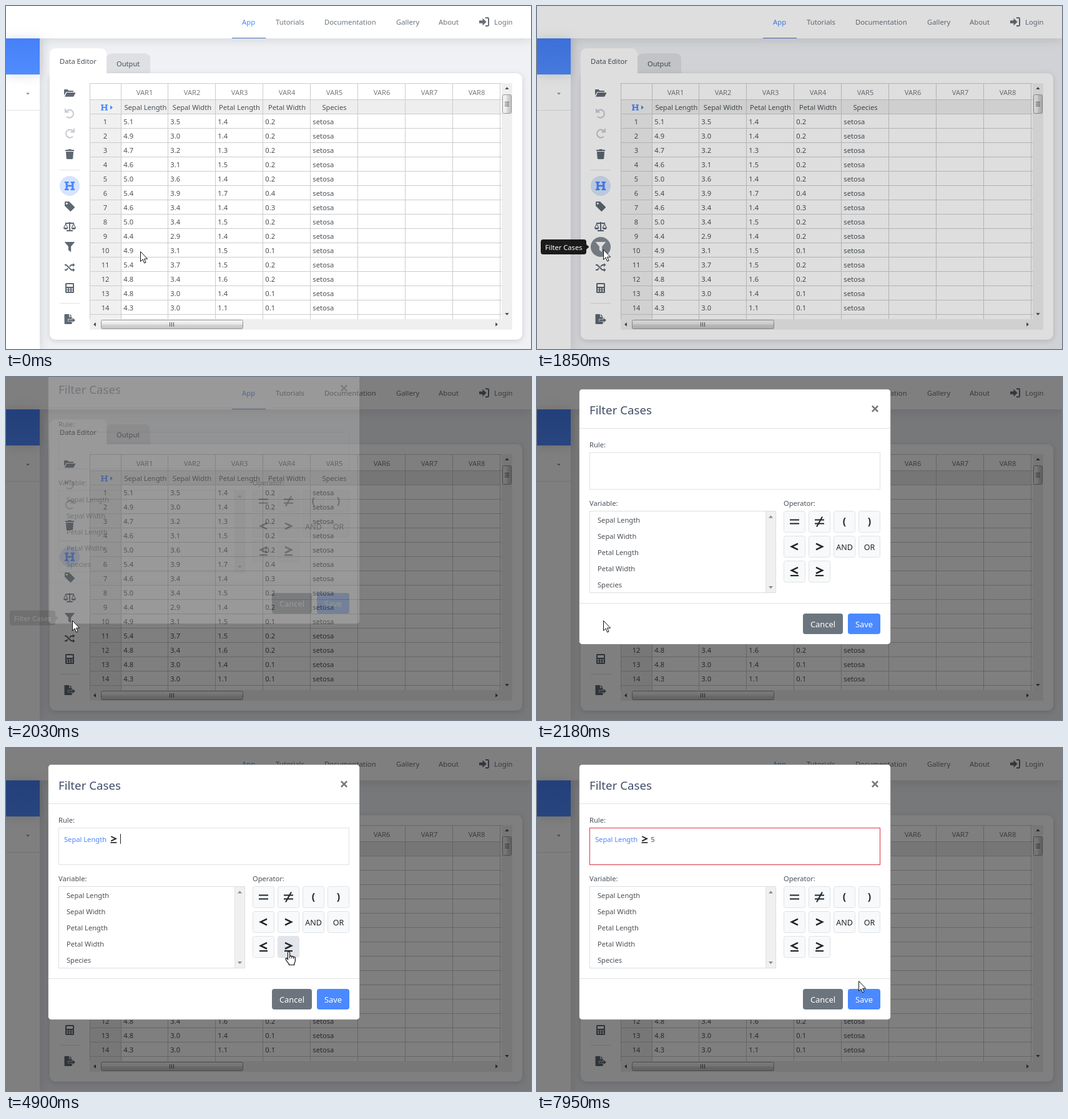
An HTML page for the animation above (8 s loop, 841 by 551 pixels).

```html
<!DOCTYPE html>
<html lang="en">
<head>
<meta charset="utf-8">
<title>Filter Cases</title>
<style>
  html, body { margin: 0; width: 100%; height: 100%; overflow: hidden; background: #f0f1f4; }
  svg { display: block; width: 841px; height: 551px; }
  text { font: 11.15px "Noto Sans", "Open Sans", sans-serif; fill: #495057; white-space: pre; }
  .mid { text-anchor: middle; }
  .nav { font-size: 11.3px; fill: #6c757d; }
  .blue { fill: #4a86fb; }
  .medium { font-weight: 500; }
  .muted { fill: #777c82; }
  .white { fill: #fff; }
  .heading { font-size: 18.7px; fill: #3f4d67; }
  .button { font-size: 12.9px; fill: #fff; }
  .word { font-size: 12.5px; fill: #212529; }
  .paren { font-size: 16px; font-weight: 700; fill: #212529; }
  .raised { filter: drop-shadow(0 2px 4px rgba(69, 80, 100, .22)); }
  .floating { filter: drop-shadow(0 1px 9px rgba(69, 80, 100, .2)); }
</style>
</head>
<body>
<svg id="stage" viewBox="0 0 841 551"></svg>
<script>
const LOOP = 8000;
const INK = '#5e6873', LIGHT = '#c9cdd2', BLUE = '#4a89ff', GRID = '#ccc';

// ---- drawing helpers ----
const rect = (x, y, w, h, fill, extra = '') =>
  `<rect x="${x}" y="${y}" width="${w}" height="${h}" fill="${fill}" ${extra}/>`;
const framed = (x, y, w, h, fill, stroke, radius = 0, extra = '') =>
  rect(x + .5, y + .5, w - 1, h - 1, fill, `stroke="${stroke}" rx="${radius}" ${extra}`);
const text = (x, y, value, cls = '') => `<text x="${x}" y="${y}" class="${cls}">${value}</text>`;
const path = (d, fill, extra = '') => `<path d="${d}" fill="${fill}" ${extra}/>`;
const stroke = (d, color, width, extra = '') =>
  path(d, 'none', `stroke="${color}" stroke-width="${width}" ${extra}`);
const group = (x, y, body, scale = '1') =>
  `<g transform="translate(${x} ${y}) scale(${scale})">${body}</g>`;
const layer = (id, body) => `<g id="${id}">${body}</g>`;
const range = n => [...Array(n).keys()];

// ---- icons, centred on 0,0 ----
const headingIcon = path('M-8-7h6.5v2.4h-1.7v3.2h6.4v-3.2h-1.7V-7H8v2.4H6.4v9.2H8V7H1.5V4.6h1.7V1.2h-6.4v3.4h1.7V7H-8V4.6h1.6v-9.2H-8z', BLUE);
const turnIcon = stroke('M-6-3A6.4 6.4 0 1 1-5 4.6M-7-8v5.4h5.6', LIGHT, 2.2);
const filterIcon = color => path('M-7.5-7.5H7.5L1.7-.8V7.5L-1.7 5V-.8Z', color, `stroke="${color}" stroke-linejoin="round"`);
const icons = {
  folder: path('M-9 3.5V-5q0-1 1-1h4.5l2 2H5q1 0 1 1v1H-5.5Z', INK) +
    path('M-4.8-1H8.6q1 0 .5 1L6.6 5q-.4.8-1.3.8H-8Z', INK),
  trash: path('M-7-7h4.2l.8-1h4l.8 1H7v2H-7ZM-6-4H6L5.3 6.6Q5.2 8 3.8 8h-7.6q-1.4 0-1.5-1.4Z', INK),
  tag: path('M-8-6.5Q-8-8-6.5-8H-1L7.6.4q.9.9 0 1.8L2.3 7.5q-.9.9-1.8 0L-8-1Z', INK) +
    '<circle cx="-4.7" cy="-4.7" r="1.5" fill="#fff"/>',
  scale: stroke('M0-7V7M-5 7H5M-7-5H7', INK, 1.9) +
    [-6.3, 6.3].map(x => group(x, 0, stroke('M-3 2L0-4L3 2', INK, 1.2) +
      path('M-3.7 2H3.7Q3.4 5 0 5T-3.7 2Z', INK))).join(''),
  shuffle: stroke('M-8-4h2.6L2.6 4H5.4M-8 4h2.6L-2.8 1.4M0-1.4L2.6-4H5.4', INK, 2) +
    path('M5-7L8.5-4L5-1ZM5 1L8.5 4L5 7Z', INK),
  calculator: rect(-7, -8, 14, 16, INK, 'rx="1.5"') + rect(-5, -6, 10, 4, '#fff') +
    range(6).map(i => rect(-5 + i % 3 * 3.9, .4 + (i / 3 | 0) * 3.4, 2.2, 2, '#fff')).join(''),
  exporting: path('M-8.5-7q0-1 1-1H-1v4.5h4.6V7q0 1-1 1h-10q-1 0-1-1ZM.2-8L3.6-4.6H.2Z', INK) +
    path('M-2.5.4H4.6V-2L9 1.7L4.6 5.4V3H-2.5Z', INK, 'stroke="#fff" stroke-width="1.2" paint-order="stroke"'),
  login: path('M-8-2.2h5.5V-6L3.6 0L-2.5 6V2.2H-8Z', '#666d75') +
    stroke('M2-6.4H5.6Q7-6.4 7-5V5Q7 6.4 5.6 6.4H2', '#666d75', 2)
};

// ---- page ----
const columnLines = [134, 184, ...range(9).map(i => 259 + 76 * i)];
const fields = ['Sepal Length', 'Sepal Width', 'Petal Length', 'Petal Width', 'Species'];
const measures = `5.1 3.5 1.4 0.2|4.9 3.0 1.4 0.2|4.7 3.2 1.3 0.2|4.6 3.1 1.5 0.2|5.0 3.6 1.4 0.2
|5.4 3.9 1.7 0.4|4.6 3.4 1.4 0.3|5.0 3.4 1.5 0.2|4.4 2.9 1.4 0.2|4.9 3.1 1.5 0.1|5.4 3.7 1.5 0.2
|4.8 3.4 1.6 0.2|4.8 3.0 1.4 0.1|4.3 3.0 1.1 0.1`.split('|').map(row => row.trim().split(' '));

function table() {
  const center = i => 222 + 76 * i;
  let s = rect(134, 124, 660, 379, '#fff') + rect(134, 150, 658, 24, '#eee') + rect(134, 150, 50, 353, '#f0f0f0');
  s += columnLines.filter(x => x < 794).map(x => rect(x, 124, 1, 379, GRID)).join('');
  s += rect(134, 124, 660, 1, GRID) + range(16).map(i => rect(134, 150 + 23 * i, 660, 1, GRID)).join('');
  s += range(8).map(i => text(center(i), 143, `VAR${i + 1}`, 'mid muted')).join('');
  s += fields.map((name, i) => text(center(i) + (i ? 0 : 1.5), 167, name, 'mid medium')).join('');
  s += group(157.5, 163, headingIcon, .68) + path('M167 159.5l4 3.5l-4 3.5z', BLUE);
  measures.forEach((row, r) => {
    const y = 190 + 23 * r;
    s += text(159, y, r + 1, 'mid');
    s += [...row, 'setosa'].map((v, c) => text(columnLines[c + 1] + 4.3, y, v)).join('');
  });
  return s;
}

function scrollbars() {
  const arrow = (x, y, turn) =>
    path('M-3.2 1.8L0-1.8L3.2 1.8Z', '#444', `transform="translate(${x} ${y}) rotate(${turn})"`);
  return rect(794, 124, 17, 396, '#efefef') + rect(134, 503, 677, 17, '#efefef') +
    framed(795, 142, 15, 31, 'url(#thumbX)', '#979797', 2) +
    framed(152, 504, 228, 15, 'url(#thumbY)', '#979797', 2) +
    range(3).map(i => rect(799, 154 + 3 * i, 7, 1, '#555') + rect(262 + 3 * i, 508, 1, 7, '#555')).join('') +
    arrow(802.5, 132, 0) + arrow(802.5, 495, 180) + arrow(142, 511.5, -90) + arrow(786, 511.5, 90);
}

function page() {
  const menu = [[378, 'App'], [432, 'Tutorials'], [510, 'Documentation'], [625, 'Gallery'], [693, 'About'], [782, 'Login']];
  const tools = [[140, icons.folder], [173, turnIcon], [205, turnIcon, '-1 1'], [238, icons.trash],
    [322, icons.tag], [354, icons.scale], [387, filterIcon(INK)], [420, icons.shuffle],
    [453, icons.calculator], [503, icons.exporting]];
  return rect(0, 0, 841, 551, '#f0f1f4') +
    rect(0, 52, 54, 499, '#fff', 'class="floating"') +
    rect(0, 0, 841, 52, '#fff', 'class="floating"') +
    rect(0, 52, 54, 58, 'url(#brand)', 'class="floating"') +
    path('M32 139.5h6l-3 3z', '#8a8f95') + rect(0, 167, 54, 1, '#e4e6e9') +
    menu.map(([x, name], i) => text(x, 30, name, i ? 'nav' : 'nav blue')).join('') +
    rect(362, 51, 54, 1, '#4a76c8') + group(766, 25.5, icons.login) +
    path('M161 108V86q0-10 10-10h50q10 0 10 10v22z', '#dfe0e3') +
    rect(70, 108, 757, 428, '#fff', 'rx="9" class="raised"') +
    path('M70 120V78q0-10 10-10h71q10 0 10 10v30h-60z', '#fff') +
    text(86, 93, 'Data Editor') + text(177, 97, 'Output') +
    tools.map(([y, body, scale]) => group(102, y, body, scale)).join('') +
    rect(86, 263, 32, 1, '#dee2e6') + rect(86, 477, 32, 1, '#dee2e6') +
    `<circle cx="102" cy="289" r="16" fill="#d7e4fd"/>` + group(102, 289, headingIcon) +
    layer('hover', '<circle cx="102" cy="387" r="16" fill="#858c95"/>' + group(102, 387, filterIcon('#fff'))) +
    table() + scrollbars();
}

// ---- dialog ----
const DARK = '#212529';
const compare = (side, lift = 0) =>
  stroke(`M${-5.5 * side} ${-4.8 - lift}L${4.6 * side} ${-lift}L${-5.5 * side} ${4.8 - lift}`, DARK, 2.5);
const underline = stroke('M-6.5 6.5H6.5', DARK, 2.2);
const equals = stroke('M-7.5-3H7.5M-7.5 3H7.5', DARK, 2);
const greaterEqual = compare(1, 1.8) + underline;
const operators = [
  equals, equals + stroke('M4.5-8L-4.5 8', DARK, 2),
  text(0, 5, '(', 'paren mid'), text(0, 5, ')', 'paren mid'),
  compare(-1), compare(1), text(0, 5, 'AND', 'word mid'), text(0, 5, 'OR', 'word mid'),
  compare(-1, 1.8) + underline, greaterEqual
].map((body, i) => ({ body, x: 395 + 40 * (i % 4), y: 222 + 40 * (i / 4 | 0) }));

function dialog() {
  return framed(67, 26, 500, 411, '#fff', 'rgba(0,0,0,.25)', 5) +
    text(84, 67, 'Filter Cases', 'heading') +
    group(541.5, 58, stroke('M-4.6-4.6L4.6 4.6M4.6-4.6L-4.6 4.6', '#777', 2.7)) +
    rect(68, 89, 498, 1, '#e0e2e4') + rect(68, 370, 498, 1, '#e0e2e4') +
    text(84, 120, 'Rule:') + text(84, 214, 'Variable:') + text(395, 214, 'Operator:') +
    framed(84, 128, 466, 60, '#fff', '#dfe1e4', 0, 'id="rule"') +
    layer('variable', text(93, 151, 'Sepal Length', 'blue medium')) +
    layer('operator', group(172.4, 147, greaterEqual, .76)) +
    layer('value', text(182.3, 151, '5')) +
    rect(0, 138, 1, 16, '#222', 'id="caret"') +
    framed(84, 222, 299, 132, '#fff', '#dcdee1') +
    rect(85, 223, 281, 26, '#f1f1f1', 'id="item"') +
    rect(366, 223, 16, 130, '#f0f0f0') + rect(366, 223, 1, 130, '#e3e3e3') +
    path('M371 233.5l3.5-4l3.5 4zM371 343l3.5 4l3.5-4z', '#8a8a8a') +
    fields.map((name, i) => text(97, 241 + 26 * i, name)).join('') +
    operators.map((o, i) => framed(o.x, o.y, 35, 35, '#f8f9fa', '#dfe2e6', 3, `id="op${i}"`) +
      group(o.x + 17.5, o.y + 17.5, o.body)).join('') +
    rect(426, 387, 64, 33, '#6c757d', 'rx="4"') + text(458, 409, 'Cancel', 'button mid') +
    rect(497, 386, 54, 35, 'none', 'rx="5" stroke="#a4c4ff" stroke-width="2" id="ring"') +
    rect(498, 387, 52, 33, BLUE, 'rx="4" id="save"') + text(524, 409, 'Save', 'button mid');
}

const gradient = (id, x, y, stops) => `<linearGradient id="${id}" x2="${x}" y2="${y}">` +
  stops.map(([at, color]) => `<stop offset="${at}" stop-color="${color}"/>`).join('') + '</linearGradient>';
const metal = [[0, '#f6f6f6'], [.48, '#e8e8e9'], [.52, '#d6d6d8'], [1, '#c3c3c6']];

document.getElementById('stage').innerHTML =
  '<defs>' + gradient('thumbX', 1, 0, metal) + gradient('thumbY', 0, 1, metal) +
  gradient('brand', 0, 1, [[0, '#4680f8'], [1, '#508cff']]) + '</defs>' +
  page() + rect(0, 0, 841, 551, '#000', 'id="backdrop"') + layer('dialog', dialog()) +
  layer('tip', rect(6, 375, 73, 24, '#000', 'rx="4" opacity=".88"') +
    path('M79 383l4.5 4l-4.5 4z', '#000', 'opacity=".88"') + text(13, 391.5, 'Filter Cases', 'white')) +
  layer('cursor',
    layer('arrow', path('M.5.5V16.5L4.2 13L6.6 19L9 18L6.6 12.2H11.6Z', '#fff', 'stroke="#111"')) +
    layer('hand', path('M-1.5 1.6Q-1.5 0 0 0T1.6 1.6V7.4Q3.6 6.2 4.7 8Q6.6 7 7.6 8.8Q10 8 10.3 10.4V15Q10.2 17.5 8.7 19V21.5H.3V19.6Q-2.6 17-4.6 13.2Q-5.6 10.4-3.4 10.4L-1.5 12.6Z', '#fff', 'stroke="#111" stroke-width="1.2"') +
      stroke('M1.6 7.4V11M4.7 8V11M7.6 8.8V11.5', '#111', 1)));

// ---- timeline ----
const tracks = {
  backdrop: [[0, 0], [1780, .02], [1850, .13], [1950, .43], [2030, .5]],
  opacity: [[0, 0], [2030, .2], [2100, .67], [2180, 1]],
  drop: [[0, -50], [2030, -40], [2100, -19], [2180, -7], [2270, -1], [2350, 0]],
  hover: [[0, 0], [710, .6], [790, 1], [1950, .5], [2030, 0]],
  tip: [[0, 0], [790, .5], [860, 1], [1950, .65], [2030, .13], [2100, 0]],
  variable: [[0, 0], [3330, 1]],
  operator: [[0, 0], [4820, 1]],
  value: [[0, 0], [7400, 1]],
  ring: [[0, 0], [6020, 1], [6100, 0]],
  rule: [[0, '#dfe1e4'], [5860, '#de8c95'], [5940, '#dc3545']],
  caretX: [[0, 93], [3330, 167], [4820, 183], [7400, 189]],
  caret: [[0, 0], [2630, 1], [3180, 0], [3330, 1], [4100, 0], [4650, 1], [5380, 0],
    [5860, 1], [6370, 0], [6530, 1], [7010, 0], [7400, 1], [7950, 0]]
};
const moves = [
  { start: 310, end: 710, steps: 6, to: [106, 391] },
  { start: 2630, end: 3180, steps: 8, to: [214, 240] },
  { start: 3800, end: 4500, steps: 10, to: [453, 327] },
  { start: 5130, end: 5550, steps: 6, to: [517, 402] },
  { start: 6530, end: 6870, steps: 5, to: [515, 374] }
];

const at = (track, t) => track.filter(([time]) => time <= t).pop()[1];
const ease = p => p * p * (3 - 2 * p);

function pointer(t) {
  let pos = [215, 394];
  for (const { start, end, steps, to } of moves) {
    if (t < start) break;
    const step = Math.floor((t - start) / (end - start) * (steps - 1) + 1e-6);
    const p = ease(Math.min(1, step / (steps - 1)));
    pos = pos.map((v, i) => Math.round(v + (to[i] - v) * p));
  }
  return pos;
}

const el = id => document.getElementById(id);
const set = (id, name, value) => el(id).setAttribute(name, value);

function draw(t) {
  const now = name => at(tracks[name], t);
  for (const id of ['backdrop', 'hover', 'tip', 'variable', 'operator', 'value', 'ring', 'caret'])
    set(id, 'opacity', now(id));
  set('dialog', 'opacity', now('opacity'));
  set('dialog', 'transform', `translate(0 ${now('drop')})`);
  set('rule', 'stroke', now('rule'));
  set('caret', 'x', now('caretX'));

  const [x, y] = pointer(t);
  const inside = (left, top, w, h) => t > 2400 && x >= left && x < left + w && y >= top && y < top + h;
  const onList = inside(85, 223, 281, 130);
  const onSave = inside(498, 387, 52, 33);
  const onOperator = operators.findIndex(o => inside(o.x, o.y, 35, 35));
  const hand = onList || onSave || onOperator >= 0;
  set('item', 'opacity', onList ? 1 : 0);
  set('item', 'y', onList ? 223 + 26 * Math.floor((y - 223) / 26) : 223);
  operators.forEach((o, i) => set('op' + i, 'fill', i === onOperator ? '#e2e6ea' : '#f8f9fa'));
  set('save', 'fill', onSave ? '#0a63ec' : BLUE);
  set('cursor', 'transform', `translate(${x} ${y})`);
  set('hand', 'opacity', hand ? 1 : 0);
  set('arrow', 'opacity', hand ? 0 : 1);
}

const begin = performance.now();
function tick() {
  draw((performance.now() - begin) % LOOP);
  requestAnimationFrame(tick);
}
tick();
</script>
</body>
</html>
```
